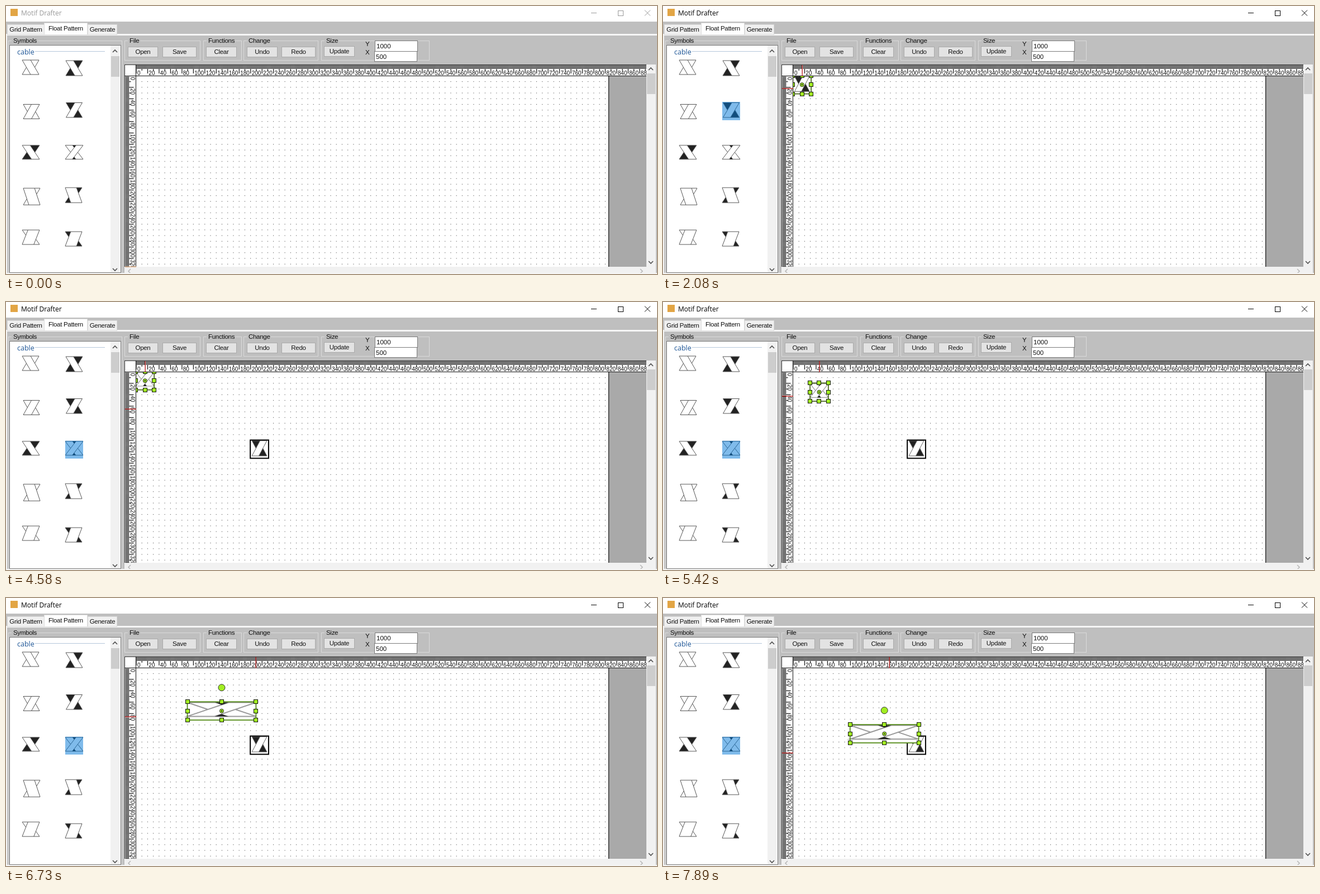
An HTML page with a canvas for the animation above (8000 ms loop, 1165 by 481 pixels).

```html
<!DOCTYPE html>
<html lang="en">
<head>
<meta charset="utf-8">
<title>Motif Drafter</title>
<style>
html, body { margin: 0; width: 100%; height: 100%; overflow: hidden; background: #fff; }
canvas { display: block; }
</style>
</head>
<body>
<canvas id="stage" width="1165" height="481"></canvas>
<script>
const W = 1165, H = 481, LOOP = 8000;
const UNIT = 1.0237, OX = 232.4, OY = 124.9;
const SANS = '"Liberation Sans", Arial, sans-serif';
const stage = document.getElementById('stage').getContext('2d');
const backdrop = document.createElement('canvas');
backdrop.width = W;
backdrop.height = H;
let g = backdrop.getContext('2d');

function box(x, y, w, h, fill, line) {
  if (fill) { g.fillStyle = fill; g.fillRect(x, y, w, h); }
  if (line) { g.strokeStyle = line; g.lineWidth = 1; g.strokeRect(x + .5, y + .5, w - 1, h - 1); }
}

function path(points, line, width = 1, fill) {
  g.beginPath();
  points.forEach(([x, y]) => g.lineTo(x, y));
  if (fill) { g.closePath(); g.fillStyle = fill; g.fill(); }
  if (line) { g.strokeStyle = line; g.lineWidth = width; g.stroke(); }
}

function disc(x, y, r, fill, line) {
  g.beginPath();
  g.arc(x, y, r, 0, 7);
  g.fillStyle = fill;
  g.fill();
  if (line) { g.strokeStyle = line; g.lineWidth = 1; g.stroke(); }
}

function clip(x, y, w, h) {
  g.save();
  g.beginPath();
  g.rect(x, y, w, h);
  g.clip();
}

function text(s, x, y, size = 11.5, color = '#111', align = 'left', font = SANS, gap = -.3) {
  g.font = `${size}px ${font}`;
  g.letterSpacing = gap + 'px';
  g.textAlign = align;
  g.fillStyle = color;
  g.fillText(s, x, y);
}

// A cable crossing: one slanted band in front, the other band behind it.
function cable(x, y, w, h, kind, line = '#555', width = 1) {
  const { lean, band, solid, knot, tip } = kind;
  const at = ([u, v]) => [x + (lean > 0 ? u : 1 - u) * w, y + v * h];
  const rest = 1 - band, dark = '#222';
  const inner = [rest * (1 - tip), tip], outer = [1 - inner[0], 1 - tip];
  const draw = (pts, fill) => path(pts.map(at), fill ? null : line, width, fill);
  if (solid) {
    draw([[0, 0], [rest, 0], inner], dark);
    draw([[1, 1], [band, 1], outer], dark);
  }
  draw([[0, 0], [1, 0], [band, 1]]);
  draw([[1, 1], [0, 1], [rest, 0]]);
  draw([[0, 0], inner]);
  draw([[1, 1], outer]);
  if (knot) {
    const cross = (rest - .5) / rest;
    draw([[band, 0], [rest, 0], [.5, cross]], dark);
    draw([[band, 1], [rest, 1], [.5, 1 - cross]], dark);
  }
}

const kind = (lean, band, solid, knot, tip = .5) => ({ lean, band, solid, knot, tip });
const wide = (lean, solid) => kind(lean, .67, solid, false, .36);
const SLANT = kind(1, .46, true), CROSS = kind(1, .4, false, true);
const ICONS = [
  [29, 97, 30, 26, kind(-1, .5)], [107, 98, 30, 27, kind(-1, .46, true)],
  [31, 176.5, 29, 26, kind(1, .5)], [107.5, 173.5, 29, 26.5, SLANT],
  [29, 250, 31, 25, kind(-1, .46, true)], [106, 250, 32, 25, CROSS],
  [31, 327, 30, 30, wide(-1)], [106, 326, 30, 27, wide(-1, true)],
  [29, 402, 31, 26, wide(1)], [106, 405, 30, 26, wide(1, true)]
];

function chevron(x, y, dx, dy, color) {
  const n = 4;
  path([[x - dx * n / 2 - dy * n, y - dy * n / 2 - dx * n], [x + dx * n / 2, y + dy * n / 2],
    [x - dx * n / 2 + dy * n, y - dy * n / 2 + dx * n]], color, 1.6);
}

function group(label, x, y, w, h) {
  box(x, y, w, h, null, '#dadada');
  g.font = `11.5px ${SANS}`;
  box(x + 6, y - 2, g.measureText(label).width + 4, 5, '#bfbfbf');
  text(label, x + 9, y + 4);
}

function button(label, x, w, y = 73) {
  box(x, y, w, 19, '#e3e3e3', '#aaa');
  text(label, x + w / 2, y + 13, 11.5, '#111', 'center');
}

function tab(label, x, y, w, fill) {
  box(x, y, w, 52 - y, fill, '#dcdcdc');
  text(label, x + w / 2, y + (y < 32 ? 14 : 13), 11.5, '#111', 'center');
}

function ruler(length, vertical) {
  for (let u = 0; u * UNIT < length; u += 2) {
    const at = u * UNIT, major = u % 20 === 0;
    const size = major ? 15 : u % 10 ? 7 : 10;
    if (!vertical) box(at, 1, 1.2, size, '#111');
    else box(1, at, size, 1.2, '#111');
    if (!major) continue;
    g.save();
    if (!vertical) g.translate(at + 2.5, 18.6);
    else {
      g.translate(10, at + 2.5);
      g.rotate(Math.PI / 2);
    }
    text(u, 0, 0, 10, '#111', 'left', SANS, 0);
    g.restore();
  }
}

function paintRulers() {
  box(212, 105, 934, 21, '#fff');
  box(212, 105, 21, 363, '#fff');
  clip(233, 105, 913, 21);
  g.translate(OX, 105);
  ruler(914, false);
  g.restore();
  clip(212, 126, 21, 342);
  g.translate(212.5, OY);
  ruler(344, true);
  g.restore();
  box(212, 105, 934, 1, '#333');
  box(212, 105, 1, 363, '#333');
  box(212, 125, 934, 1, '#111');
  box(232, 105, 1, 363, '#111');
}

function paintBackdrop() {
  box(0, 0, W, H, '#fff');
  box(8, 5, 13, 13, '#e2a545');
  box(0, 28, W, 453, '#bfbfbf');
  box(0, 50, W, 3, '#f6f6f6');
  box(0, 50, 2, 431, '#f6f6f6');
  tab('Grid Pattern', 2, 33, 67, '#f0f0f0');
  tab('Generate', 146, 33, 53, '#f0f0f0');
  tab('Float Pattern', 68, 30, 78, '#fff');

  group('Symbols', 4, 62, 204, 430);
  box(6, 70, 200, 409, '#fff', '#777');
  text('cable', 20, 86.5, 12.5, '#1d5596', 'left', '"Open Sans", sans-serif', 0);
  box(52, 81, 125, 1, '#b5c6da');
  box(187, 71, 17, 407, '#f1f1f1');
  box(188, 90, 15, 37, '#cdcdcd');
  chevron(195, 81, 0, -1, '#505050');
  chevron(195, 473, 0, 1, '#505050');
  ICONS.forEach(icon => cable(...icon));

  group('File', 212, 62, 136, 36);
  group('Functions', 353, 62, 69, 36);
  group('Change', 425, 62, 134, 36);
  group('Size', 564, 62, 194, 36);
  button('Open', 218, 54);
  button('Save', 280, 61);
  button('Clear', 358, 55);
  button('Undo', 431, 55);
  button('Redo', 493, 61);
  button('Update', 569, 55, 72);
  text('Y', 643, 72);
  text('X', 643, 87);
  box(660, 62, 77, 20, '#fff', '#7a7a7a');
  box(659, 81, 77, 19, '#fff', '#7a7a7a');
  text('1000', 663, 75.5, 11.5, '#111', 'left', SANS, 0);
  text('500', 662, 95, 11.5, '#111', 'left', SANS, 0);

  box(233, 126, 846, 342, '#fff');
  for (let y = OY + 10 * UNIT; y < 468; y += 10 * UNIT)
    for (let x = OX + 10 * UNIT; x < 1078; x += 10 * UNIT)
      box(x, y, UNIT, UNIT, '#333');
  box(1078, 126, 1.5, 342, '#111');
  box(1079.5, 126, 66.5, 342, '#a9a9a9');
  paintRulers();

  box(1146, 105, 17, 364, '#f1f1f1');
  box(1147, 121, 15, 37, '#cdcdcd');
  chevron(1154, 113, 0, -1, '#505050');
  chevron(1154, 460, 0, 1, '#505050');
  box(212, 468, 951, 11, '#f1f1f1');
  chevron(221, 476, -1, 0, '#b8b8b8');
  chevron(1137, 476, 1, 0, '#b8b8b8');
  box(0, 479, W, 2, '#f6f6f6');
}

// Pointer moves: start, end, number of steps, corner points of the way.
const MOVES = [
  [0, 0, 1, [[200, 468]]],
  [140, 290, 3, [[823, 440], [501, 295]]],
  [440, 600, 3, [[400, 275], [200, 227]]],
  [1060, 1060, 1, [[200, 194]]],
  [1290, 1760, 7, [[240, 190], [285, 172], [249, 149]]],
  [2080, 2080, 1, [[249, 148]]],
  [2230, 2460, 4, [[310, 182], [455, 268]]],
  [2537, 2690, 3, [[400, 250], [200, 210]]],
  [3630, 3880, 4, [[287, 215], [200, 240]]],
  [4190, 4190, 1, [[200, 293]]],
  [4580, 4960, 6, [[249, 192], [282, 175], [250, 149]]],
  [5120, 5880, 11, [[254, 152], [342, 209]]],
  [5950, 6030, 2, [[350, 214], [357, 201]]],
  [6520, 6730, 4, [[386, 203], [447, 213]]],
  [6800, 7280, 7, [[447, 218], [430, 232], [400, 222]]],
  [7350, 7570, 4, [[391, 222], [388, 227]]],
  [7740, 7890, 3, [[394, 245], [405, 278]]]
];

function pointer(t) {
  const [start, end, steps, pts] = MOVES.filter(m => m[0] <= t).pop();
  if (steps < 2) return pts[0];
  const k = Math.min(steps - 1, Math.floor((t - start) / (end - start) * (steps - 1) + 1e-6));
  const u = k / (steps - 1) * (pts.length - 1);
  const i = Math.min(pts.length - 2, Math.floor(u)), f = u - i;
  return pts[i].map((v, axis) => v + (pts[i + 1][axis] - v) * f);
}

// Position on the 10-unit grid for a pointer holding the shape at (gx, gy).
function dragged(t, gx, gy) {
  const [x, y] = pointer(t);
  return [Math.round((x - gx) / 10 / UNIT) * 10, Math.round((y - gy) / 10 / UNIT) * 10];
}

function shape(kind, [ux, uy], units, selected, rim = '#46651a') {
  const x = OX + ux * UNIT, y = OY + uy * UNIT, w = units * UNIT, h = 32 * UNIT;
  box(x, y, w, h, '#fff');
  if (kind === CROSS) cable(x, y + 1.2, w, h * .76, kind, '#999', units > 40 ? 2 : 1.2);
  else cable(x + 3, y + 1.2, w - 6, h - 5.5, kind, '#666');
  g.strokeStyle = selected ? rim : '#000';
  g.lineWidth = selected ? 1.7 : 2;
  g.strokeRect(x, y, w, h);
  if (!selected) return;
  const green = '#a2ee22';
  disc(x + w / 2, y + h / 2, 3.5, green, '#222');
  disc(x + w / 2, y + h / 2, 1.2, '#222');
  disc(x + w / 2, y - 25.5, 6, green, '#333');
  for (const i of [0, .5, 1])
    for (const j of [0, .5, 1])
      if (i !== .5 || j !== .5)
        box(Math.round(x + w * i) - 4, Math.round(y + h * j) - 4, 8, 8, green, '#111');
}

function paintTitle(t) {
  const ink = t < 980 ? '#999' : '#000';
  text('Motif Drafter', 27, 16.5, 12, ink, 'left', '"Open Sans", sans-serif', 0);
  box(1047, 12, 10, 1, ink);
  box(1095, 8, 10, 10, null, ink);
  path([[1143, 7.5], [1153, 17.5]], ink);
  path([[1153, 7.5], [1143, 17.5]], ink);
}

function paintShapes(t) {
  clip(233, 126, 845, 342);
  if (t >= 1060) {
    const at = t < 2230 ? [0, 0] : dragged(Math.min(t, 2460), 250, 145);
    shape(SLANT, at, 32, t < 4190);
  }
  if (t >= 4190) {
    let at = [0, 0], units = 32;
    if (t >= 5120) at = dragged(Math.min(t, 5880), 250, 148);
    if (t >= 6520) units = dragged(Math.min(t, 6730), OX, OY)[0] - 90;
    if (t >= 7740) at = dragged(t, 303, 175);
    shape(CROSS, at, units, true, t < 6350 ? '#46651a' : '#4c860c');
  }
  g.restore();
}

function paint(t) {
  g.drawImage(backdrop, 0, 0);
  paintTitle(t);
  if (t >= 1060 && t < 3480) box(106, 172, 32, 33, 'rgba(0,120,215,.5)');
  if (t >= 4190) box(106, 249, 32, 32, 'rgba(0,120,215,.5)');
  paintShapes(t);
  const [x, y] = pointer(t).map(Math.round);
  box(213, y - .5, 20, 1.3, t < 140 ? '#e9b080' : '#c81c1c');
  if (x > 233) box(x - .5, 106, 1.3, 20, '#b81818');
}

paintBackdrop();
g = stage;
const begin = performance.now();
function tick() {
  paint((performance.now() - begin) % LOOP);
  requestAnimationFrame(tick);
}
tick();
</script>
</body>
</html>
```
